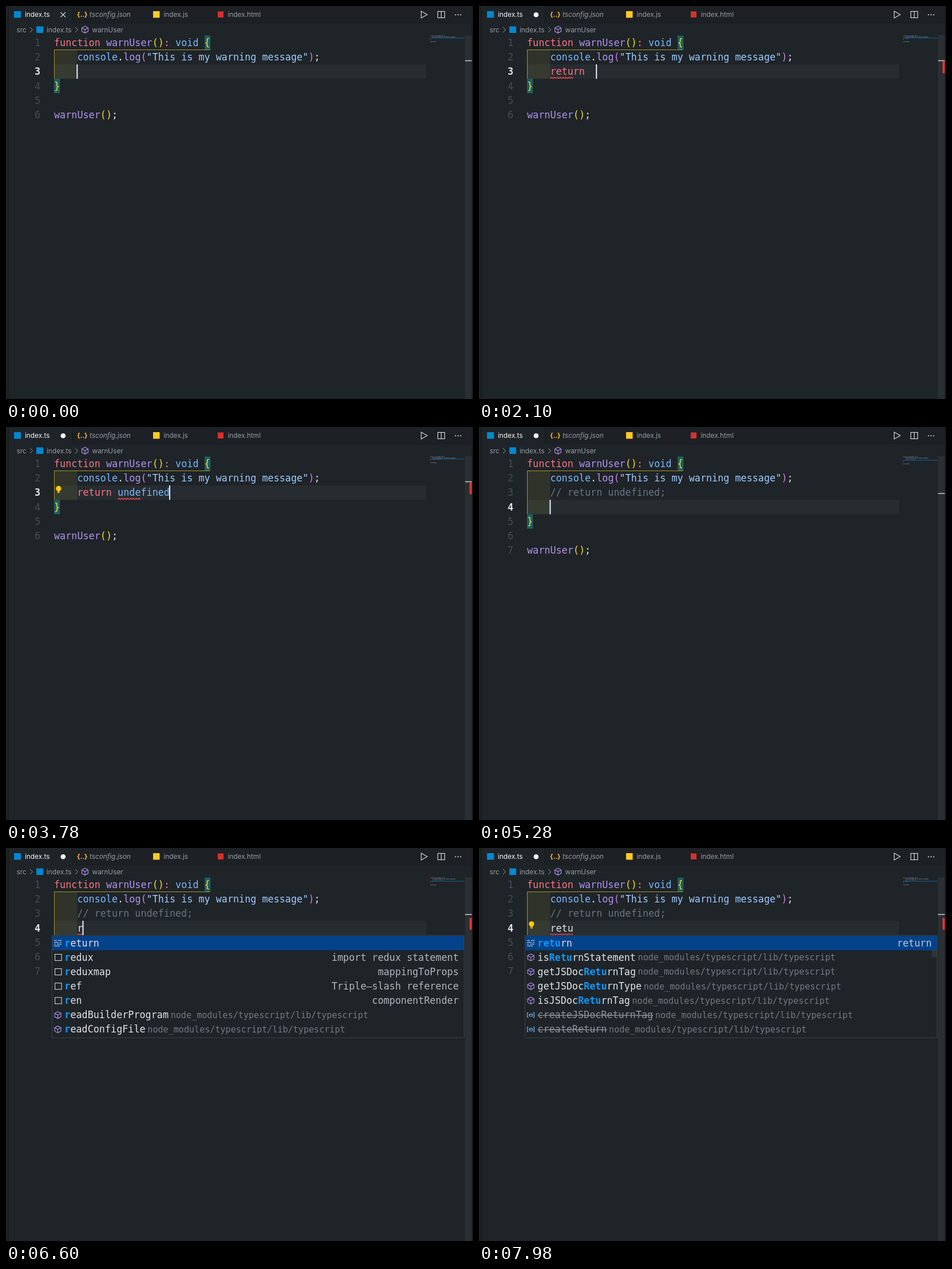
These frames come from a looping animation (816x686 px, 8000 ms). An HTML page with a canvas:

```html
<!DOCTYPE html>
<html lang="en">
<head>
<meta charset="utf-8">
<title>Editor typing</title>
<style>
  html, body { margin: 0; width: 100%; height: 100%; overflow: hidden; background: #1f2428; }
  canvas { display: block; width: 816px; height: 686px; }
</style>
</head>
<body>
<canvas id="stage" width="816" height="686"></canvas>
<script>
const ctx = document.getElementById('stage').getContext('2d');
const LOOP = 8000, CW = 10.1, ROW = 25.2, LEFT = 84, TOP = 51.5;
const MONO = '"DejaVu Sans Mono", monospace', UI = 'Inter, sans-serif';
const CODE = `16.78px ${MONO}`, CODE_BOLD = `bold 16.78px ${MONO}`, SMALL = `15.1px ${MONO}`;
const C = {
  bg: '#1f2428', edge: '#14171a', text: '#e1e4e8', dim: '#959da5', mute: '#6a737d',
  red: '#f97583', purple: '#b392f0', blue: '#79b8ff', string: '#9ecbff',
  gold: '#ffd92e', pink: '#c983dc', hit: '#0d97fb', error: '#f14c4c'
};

// [time, text on the edited line]; the line break comes at NEWLINE
const NEWLINE = 5100;
const EDITS = [
  [0, ''], [480, 'r'], [640, 're'], [860, 'ret'], [1020, 'retu'], [1500, 'return'],
  [1620, 'return '], [1860, 'return  '], [2340, 'return '], [2640, 'return u'],
  [2820, 'return un'], [3000, 'return und'], [3180, 'return unde'],
  [3480, 'return undefined'], [4320, 'return undefined;'], [4680, '// return undefined;'],
  [NEWLINE, ''], [5400, 'r'], [5520, 're'], [5700, 'ret'], [5880, 'retr'],
  [6360, 'ret'], [6480, 're'], [6600, 'r'], [6720, ''],
  [7000, 'r'], [7160, 're'], [7400, 'ret'], [7460, 'retu']
];
// [from, to, first column, length] of error underlines
const ERRORS = [
  [1080, 2220, 4, 4], [3300, 4020, 11, 4], [6240, 6360, 4, 4], [6360, 6480, 4, 3],
  [6480, 6600, 4, 2], [6600, 6720, 4, 1], [6720, 7680, 3, 1], [7680, 8000, 4, 4]
];
const BULBS = [[3600, 4020], [7740, 8000]];

const LIB = 'node_modules/typescript/lib/typescript';
// [icon, label, path, text on the right]; stars mark the matched letters
const RE_LIST = [
  ['key', 'return'], ['snip', 'redux', '', 'import redux statement'],
  ['snip', 'reduxmap', '', 'mappingToProps'], ['snip', 'ref', '', 'Triple–slash reference'],
  ['snip', 'ren', '', 'componentRender'], ['cube', 'readBuilderProgram', LIB],
  ['cube', 'readConfigFile', LIB]
];
const RETU_LIST = [
  ['key', 'return', '', 'return'], ['cube', 'isReturnStatement', LIB],
  ['cube', 'getJSDocReturnTag', LIB], ['cube', 'getJSDocReturnType', LIB],
  ['cube', 'isJSDocReturnTag', LIB], ['old', 'createJSDocReturnTag', LIB],
  ['old', 'createReturn', LIB]
];
const RETR_LIST = [
  ['key', '*ret*u*r*n', '', 'return'], ['cube', '*re*solve*Tr*ipleslashReference', LIB],
  ['cube', '*re*duceEach*Tr*ailingCommentRange', LIB],
  ['cube', '*re*solve*T*ype*R*eferenceDirective', LIB],
  ['var', '*R*TCIc*eTr*ansport'], ['var', '*R*TCIc*eTr*ansportStateChangedEvent'],
  ['cube', '*re*solveProjec*tR*eferencePath', LIB]
];
const UNDE_LIST = [
  ['var', 'undefined', '', 'undefined'], ['var', 'UnderlyingSink'], ['var', 'UnderlyingSource'],
  ['var', 'UnderlyingByteSource'], ['var', 'UnderlyingDefaultSource'],
  ['cube', 'isUndefinedKeyword', LIB], ['cube', 'createUndefined', LIB]
];
const LISTS = {
  r: RE_LIST, re: RE_LIST, ret: RETU_LIST, retu: RETU_LIST, retr: RETR_LIST,
  u: UNDE_LIST, un: UNDE_LIST, und: UNDE_LIST, unde: UNDE_LIST
};

const HEAD = [
  [['function ', C.red], ['warnUser', C.purple], ['()', C.gold], [': ', C.red], ['void ', C.blue], ['{', C.gold]],
  [['    console', C.blue], ['.', C.text], ['log', C.purple], ['(', C.pink],
   ['"This is my warning message"', C.string], [')', C.pink], [';', C.text]]
];
const TAIL = [[['}', C.gold]], [], [['warnUser', C.purple], ['()', C.gold], [';', C.text]]];
const WORD_COLORS = { return: C.red, undefined: C.blue };

function rect(x, y, w, h, color) {
  ctx.fillStyle = color;
  ctx.fillRect(x, y, w, h);
}
function write(s, x, y, color, font = CODE, align = 'left') {
  ctx.font = font;
  ctx.textAlign = align;
  ctx.fillStyle = color;
  ctx.fillText(s, x, y);
}
// open or closed path through [x, y] pairs
function path(points, color, width = 1, close = false) {
  ctx.beginPath();
  points.forEach(([x, y]) => ctx.lineTo(x, y));
  if (close) ctx.closePath();
  ctx.strokeStyle = color;
  ctx.lineWidth = width;
  ctx.stroke();
}
function disc(x, y, r, color) {
  ctx.beginPath();
  ctx.arc(x, y, r, 0, 7);
  ctx.fillStyle = color;
  ctx.fill();
}
function cube(x, y) {
  const at = (dx, dy) => [x + dx, y + dy];
  path([at(0, -6), at(5.5, -3), at(5.5, 3), at(0, 6), at(-5.5, 3), at(-5.5, -3)], C.purple, 1.1, true);
  path([at(-5.5, -3), at(0, 0), at(5.5, -3)], C.purple, 1.1);
  path([at(0, 0), at(0, 6)], C.purple, 1.1);
}

function tokens(line) {
  if (line.startsWith('//')) return [['    ' + line, C.mute]];
  const parts = line.match(/\w+|\W+/g) || [];
  return [['    ', C.text], ...parts.map(p => [p, WORD_COLORS[p] || C.text])];
}

function header(clean) {
  rect(115, 0, 699, 29, '#1d2125');
  rect(115, 0, 1, 29, C.edge);
  rect(115, 29, 699, 1, '#181c1f');
  const font = `11.8px ${UI}`;
  rect(14, 9, 12, 11.5, '#0288d1');
  write('index.ts', 33, 19, '#f6f8fa', font);
  if (clean) {
    path([[95.5, 11], [104, 19.5]], '#d1d5da', 1.2);
    path([[104, 11], [95.5, 19.5]], '#d1d5da', 1.2);
  } else disc(99.8, 15.2, 4.3, '#f6f8fa');
  write('{..}', 124, 19, '#fbc02d', `bold 11.5px ${UI}`);
  write('tsconfig.json', 146, 19, C.dim, 'italic ' + font);
  rect(257, 9, 11.5, 11.5, '#ffca28');
  write('index.js', 275.5, 19, C.dim, font);
  rect(370, 9.5, 10, 10.5, '#d9302c');
  write('index.html', 387.5, 19, C.dim, font);

  path([[725.5, 9], [736, 15], [725.5, 21]], '#d1d5da', 1.2, true);
  ctx.strokeRect(754.5, 9.5, 12, 11);
  path([[760.5, 9.5], [760.5, 20.5]], '#d1d5da', 1.2);
  [785.5, 790, 794.5].forEach(x => disc(x, 15.3, 1.1, '#d1d5da'));

  write('src', 18.5, 45.5, C.dim, font);
  write('index.ts', 71, 45.5, C.dim, font);
  write('warnUser', 150.5, 45.5, C.dim, font);
  [42, 121].forEach(x => path([[x, 37], [x + 4.5, 41.5], [x, 46]], C.dim));
  rect(53, 35.5, 12, 11.5, '#0288d1');
  cube(138, 41.3);
}

function minimap(lines, row) {
  ctx.globalAlpha = 0.5;
  lines.forEach((line, i) => {
    let x = 741;
    for (const [s, color] of line) {
      for (const ch of s) {
        if (ch !== ' ') rect(x, 51.5 + i * 2.05, 0.85, 1.2, color);
        x += 0.96;
      }
    }
  });
  ctx.globalAlpha = 1;
  rect(741, 51 + row * 2.05, 60, 1.7, 'rgba(20,110,170,.5)');
}

function squiggle(row, col, len) {
  const x = LEFT + col * CW, y = TOP + (row + 1) * ROW - 1.6, points = [];
  for (let d = 0; d <= len * CW; d += 2.5) points.push([x + d, y + (points.length % 2 ? -1.2 : 1.2)]);
  path(points, C.error, 1.2);
}

function bulb(y) {
  disc(91.8, y - 1.5, 4.6, '#ffcc00');
  rect(89.7, y + 2, 4.2, 4.2, '#ffcc00');
  rect(89.7, y + 3.8, 4.2, 0.8, '#5a4b10');
}

function itemIcon(kind, y) {
  if (kind === 'cube') cube(90.5, y);
  else if (kind === 'snip') {
    ctx.strokeStyle = '#d1d5da';
    ctx.lineWidth = 1.1;
    ctx.strokeRect(85.5, y - 5.5, 11.5, 11);
  } else if (kind === 'key') {
    [[0, 5], [7, 6], [0, 8], [10, 3], [0, 3], [5, 8], [0, 10]].forEach(([dx, w], i) =>
      rect(84 + dx, y - 5 + Math.floor(i / 2) * 3.2, w, 1.1, '#d1d5da'));
  } else {
    for (const s of [-1, 1]) {
      const x = 90.5 + s * 6;
      path([[x - s * 2, y - 4], [x, y - 4], [x, y + 4], [x - s * 2, y + 4]], C.blue, 1.1);
    }
    path([[87.5, y - 1], [91, y - 2.5], [94, y - 1], [94, y + 1.5], [90.5, y + 3], [87.5, y + 1.5]], C.blue, 1, true);
    path([[87.5, y - 1], [90.5, y + 0.3], [94, y - 1]], C.blue, 0.9);
  }
}

function popup(list, query, row) {
  const top = TOP + (row + 1) * ROW + 0.5, h = 25.15, height = h * list.length + 2.5;
  rect(80, top - 0.5, 721, height + 1, '#3b4148');
  rect(81, top + 0.5, 719, height - 1, C.bg);
  rect(81, top + 0.5, 719, h, '#044289');
  list.forEach(([icon, label, file, right], i) => {
    const base = top + 18.7 + i * h, mid = base - 5.7;
    const old = icon === 'old', color = old ? '#8b929a' : C.text;
    itemIcon(icon, mid);
    const marked = label.includes('*') ? label : label.replace(new RegExp(query, 'i'), '*$&*');
    let x = 102.3;
    if (old) {
      write(label, x, base, color);
      rect(x, mid, label.length * CW, 1.3, color);
      x += label.length * CW;
    } else marked.split('*').forEach((part, n) => {
      write(part, x, base, n % 2 ? C.hit : color, n % 2 ? CODE_BOLD : CODE);
      x += part.length * CW;
    });
    if (file) write(file, x + 3.6, base - 0.4, '#737a82', SMALL);
    if (right) write(right, 791, base, i ? '#b0b6bd' : '#b9c9de', CODE, 'right');
  });
  if (list === RETU_LIST) rect(791, top + h, 9, 12.5, 'rgba(106,115,125,.2)');
}

function draw(t) {
  const [since, cur] = EDITS.filter(e => e[0] <= t).pop();
  const broken = t >= NEWLINE, row = broken ? 3 : 2;
  const lines = [...HEAD, ...(broken ? [tokens('// return undefined;')] : []), tokens(cur), ...TAIL];
  const y = TOP + row * ROW;
  const errors = ERRORS.filter(e => t >= e[0] && t < e[1]);

  rect(0, 0, 816, 686, C.bg);
  header(t < EDITS[1][0]);

  rect(LEFT, y, 650, ROW, '#272c31');
  rect(LEFT, TOP + ROW, 40.4, ROW * row, 'rgba(255,255,64,.07)');
  const match = 'rgba(23,229,230,.31)';
  rect(LEFT + 26 * CW + 0.5, TOP, CW, ROW, match);
  rect(LEFT, TOP + (row + 1) * ROW, CW, ROW, match);
  rect(LEFT, TOP + ROW - 0.7, 27 * CW, 1, '#a8922a');
  rect(LEFT, TOP + ROW, 1, ROW * row, '#a8922a');

  lines.forEach((line, i) => {
    const base = TOP + 18.5 + i * ROW;
    const active = i === row;
    write(i + 1, 60, base, active ? C.text : '#444d56', active ? CODE_BOLD : CODE, 'right');
    let x = LEFT;
    for (const [s, color] of line) {
      write(s, x, base, color);
      x += s.length * CW;
    }
  });

  errors.forEach(([, , col, len]) => squiggle(row, col, len));
  if (BULBS.some(([a, b]) => t >= a && t < b)) bulb(y + 7);
  if ((t - since) % 1000 < 500) rect(LEFT + (4 + cur.length) * CW - 1, y, 2, ROW, '#e6f0fb');

  minimap(lines, row);
  rect(802, 51, 12, 635, '#2a2f34');
  if (errors.length) rect(810, TOP + (row - 0.2) * ROW, 4, 20.5, '#e5342b');
  rect(802, y - 7.3 - (row - 2) * 4.6, 12, 1.8, '#aeb4ba');

  const word = cur.split(' ').pop();
  if (LISTS[word]) popup(LISTS[word], word, row);

  rect(3, 0, 1.3, 686, C.edge);
  rect(814, 0, 1.3, 686, C.edge);
}

function tick() {
  draw(performance.now() % LOOP);
  requestAnimationFrame(tick);
}
tick();
</script>
</body>
</html>
```
